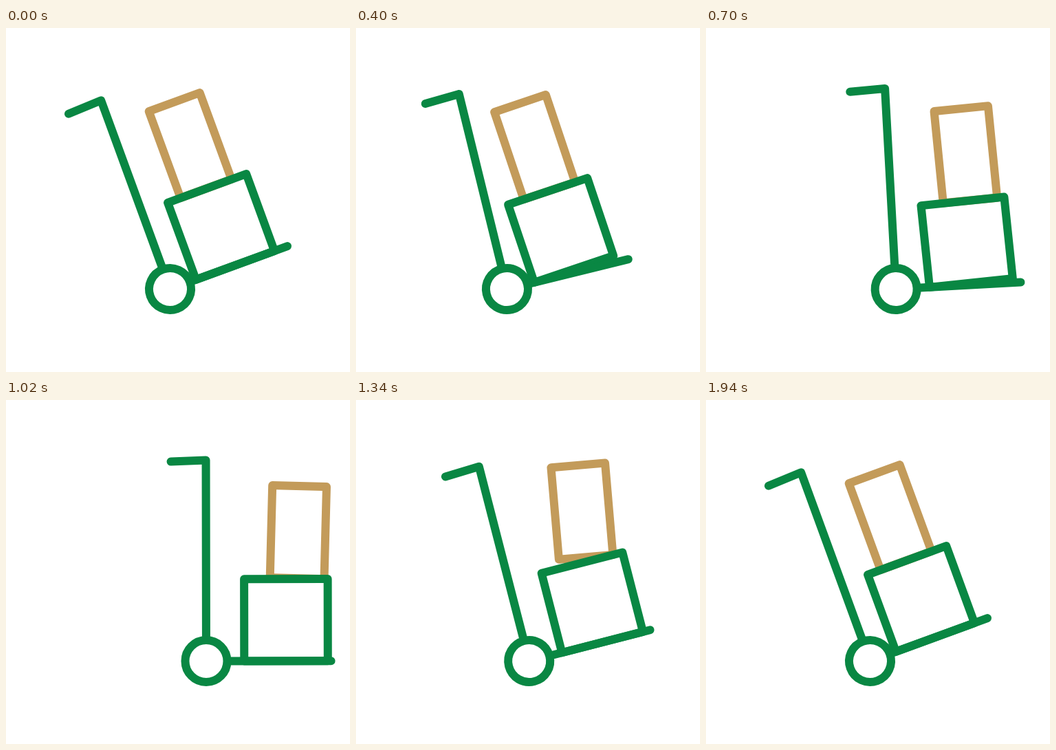
Write an HTML page that moves like this. It is 500x500 px and loops after 2200 ms.

```html
<!DOCTYPE html>
<html lang="en">
<head>
<meta charset="utf-8">
<title>Hand truck</title>
<style>
  html, body { margin: 0; width: 100%; height: 100%; overflow: hidden; background: #fff; }
  svg { display: block; width: 100vw; height: 100vh; }
  g { fill: none; stroke: #098743; stroke-width: 12; stroke-linecap: round; stroke-linejoin: round; }
  #parcel { stroke: #c39b5a; }
</style>
</head>
<body>
<svg viewBox="0 0 500 500">
  <g id="truck">
    <g id="load">
      <g id="parcel"><rect x="-78.8" y="-134" width="78.8" height="134"/></g>
      <rect y="-119.2" width="121.5" height="119.2"/>
    </g>
    <path d="M0-31V-292L-51-290M31 0H181.6"/>
    <circle r="30.5"/>
  </g>
</svg>
<script>
const LOOP = 2200, STEP = 20, REST = -20.1;

// Smooth 0 to 1 between two times; bend above 1 moves the effort earlier
function ease(t, from, to, bend = 1) {
  const u = Math.min(1, Math.max(0, (t - from) / (to - from)));
  const w = 1 - (1 - u) ** bend;
  return w * w * (3 - 2 * w);
}

function place(id, x, y, angle) {
  document.getElementById(id).setAttribute("transform", `translate(${x} ${y}) rotate(${angle})`);
}

function draw(now) {
  const t = Math.floor((now % LOOP) / STEP) * STEP;
  const go = (from, to, bend) => ease(t, from, to, bend);

  // Wind up, push forward, pull back, settle
  const pull = go(1000, 1600, 1.05), settle = go(1600, 1940, 1.4);
  const wheelX = 238.5 - 25.5 * go(0, 320, 0.8) + 78.2 * go(320, 1000, 1.55) - 63.2 * pull + 10.5 * settle;

  // Angles on the stage: the load lags behind the truck, the parcel behind the load
  const swing = 3 * settle - 23.1 * pull;
  const truck = REST - REST * go(120, 930, 1.1) + swing;
  const load = REST - REST * go(300, 1000, 1.2) + swing;
  const loose = REST + 21.6 * go(300, 1050, 1.25) - 24 * go(1050, 1680, 0.67);
  const parcel = Math.max(load, loose);

  // Sliding along the plate and along the lower box
  const slide = 40 + 15.3 * (go(300, 1020) - go(1080, 1640, 0.9));
  const shift = 98.6 + 17.8 * (go(120, 1020) - go(1080, 1640, 1.15));

  place("truck", wheelX, 379.5, truck);
  place("load", slide, 0, load - truck);
  place("parcel", shift, -119.2, parcel - load);
}

let start;
function tick(now) {
  start ??= now;
  draw(now - start);
  requestAnimationFrame(tick);
}
draw(0);
requestAnimationFrame(tick);
</script>
</body>
</html>
```
